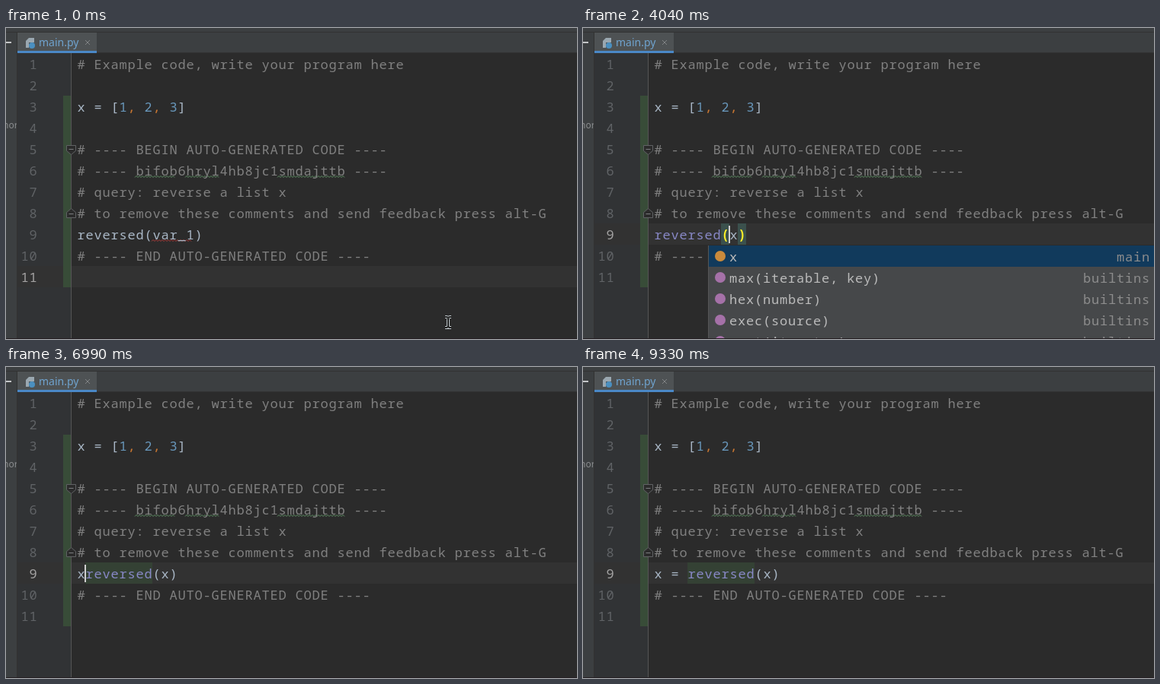
Write an HTML page that moves like this. It is 749x409 px and loops after 9.73 s.

```html
<!DOCTYPE html>
<html lang="en">
<head>
<meta charset="utf-8">
<title>Editor</title>
<style>
html, body { margin: 0; width: 100%; height: 100%; overflow: hidden; background: #2b2b2b; }
#stage { position: relative; width: 749px; height: 409px; overflow: hidden; background: #2b2b2b; }
#stage div, #stage svg { position: absolute; }
.code, .num, .popup { font: 17px/29px "Noto Sans Mono", "DejaVu Sans Mono", monospace; letter-spacing: .8px; white-space: pre; }
.ui { font: 14px/20px "Noto Sans", "Open Sans", sans-serif; white-space: pre; }
.bar { left: 0; top: 0; width: 749px; height: 33px; background: #3c3f41; }
.side { left: 0; top: 0; width: 14px; height: 409px; background: #3c3f41; overflow: hidden; }
.gutter { left: 14px; top: 33px; width: 71px; height: 376px; background: #313335; }
.edge { left: 85px; top: 33px; width: 1px; height: 376px; background: #555; }
.changed { left: 75px; top: 89px; width: 10px; height: 252px; background: #384c38; }
.tab { left: 15px; top: 6px; width: 104px; height: 24px; background: #4e5254; border-bottom: 3px solid #4a88c7; }
.rule { background: #323232; }
#current { left: 14px; width: 735px; height: 28px; background: #323232; }
.code { left: 93.4px; height: 28px; color: #a9b7c6; }
.num { left: 14px; width: 27.4px; height: 28px; text-align: right; color: #606366; }
.num.on { color: #a4a3a3; }
.c { color: #808080; }
.n { color: #6897bb; }
.p { color: #cc7832; }
.f { color: #8888c6; }
.hit, .pair { display: inline-block; height: 28px; vertical-align: top; }
.hit { background: #344134; }
.pair { background: #3b514d; color: #ffef28; font-weight: bold; }
#caret { width: 2px; height: 23px; background: #d0d0d0; }
.popup { top: 286px; width: 589px; height: 140px; background: #46484a; color: #bbb; box-shadow: 0 0 0 1px #555 inset; }
.popup div { left: 1px; width: 587px; height: 28px; }
.popup div:first-child { background: #113a5c; }
.popup i { position: absolute; left: 8px; top: 7px; width: 14px; height: 14px; border-radius: 50%; }
.popup b { position: absolute; left: 27px; font-weight: normal; }
.popup u { position: absolute; right: 8px; color: #8c8c8c; text-decoration: none; }
#mouse { --rim: #141414; --core: #fff; }
#mouse.system { --rim: #c4ccd0; --core: #1c1c1c; }
</style>
</head>
<body>
<div id="stage">
  <div class="gutter"></div>
  <div id="current"></div>
  <div class="changed"></div>
  <div class="edge"></div>
  <div class="bar"></div>
  <div class="side"><div class="ui" style="left:-4px;top:118px;font-size:12px;color:#8a8c8e">nor</div></div>
  <div class="rule" style="left:0;top:5px;width:749px;height:1px"></div>
  <div class="rule" style="left:14px;top:32px;width:735px;height:1px"></div>
  <div class="rule" style="left:14px;top:6px;width:1px;height:403px"></div>
  <div class="tab"></div>
  <div class="ui" style="left:43px;top:9px;color:#6fa3cf">main.py</div>
  <svg width="749" height="409" fill="none">
    <path d="M0 19h7" stroke="#c4c6c8" stroke-width="2"/>
    <path d="M30 13h7v6h-7v7h-4v-9z" fill="#9aa7b0"/>
    <circle cx="34" cy="23" r="4" fill="#4a8fc0"/>
    <path d="M104 16l6 6m0-6l-6 6" stroke="#808385"/>
    <path d="M79.5 154.5h12v7l-6 5-6-5zM79.5 249.5h12v-7l-6-5-6 5z" fill="#2b2b2b" stroke="#606264"/>
    <path d="M82.5 159.5h6m-6 85h6" stroke="#7c7e80"/>
    <path id="typos" stroke="#659c6b" stroke-width=".9"/>
    <path id="error" stroke="#bc3f3c" stroke-width=".9"/>
  </svg>
  <div id="rows"></div>
  <div id="caret"></div>
  <div id="popup" class="popup"></div>
  <svg id="mouse" width="14" height="20" viewBox="-7 -10 14 20" fill="none">
    <path id="beam" d="M-4-7h2L0-6 2-7H4M-4 7h2L0 6 2 7H4M0-6v12" style="stroke:var(--rim);stroke-width:4"/>
    <path d="M-4-7h2L0-6 2-7H4M-4 7h2L0 6 2 7H4M0-6v12" style="stroke:var(--core);stroke-width:2"/>
  </svg>
  <div style="left:0;top:408px;width:749px;height:1px;background:#241e22"></div>
</div>
<script>
const LOOP = 9730, LEFT = 93, PITCH = 10.99;
const $ = id => document.getElementById(id);
const span = (cls, text) => `<span class="${cls}">${text}</span>`;
const rowTop = n => 33 + 28 * (n - 1);
const colX = c => Math.floor(LEFT + c * PITCH);

const comma = span('p', ',');
const lines = [
  span('c', '# Example code, write your program here'),
  '',
  `x = [${span('n', 1)}${comma} ${span('n', 2)}${comma} ${span('n', 3)}]`,
  '',
  span('c', '# ---- BEGIN AUTO-GENERATED CODE ----'),
  span('c', '# ---- bifob6hryl4hb8jc1smdajttb ----'),
  span('c', '# query: reverse a list x'),
  span('c', '# to remove these comments and send feedback press alt-G'),
  '',
  span('c', '# ---- END AUTO-GENERATED CODE ----'),
  ''
];
$('rows').innerHTML = lines.map((html, i) => {
  const top = `style="top:${rowTop(i + 1)}px"`;
  return `<div class="num" id="num${i + 1}" ${top}>${i + 1}</div>` +
         `<div class="code" id="line${i + 1}" ${top}>${html}</div>`;
}).join('');

// Zigzag underline below columns from..to of a row
function wave(row, from, to) {
  const width = colX(to) - colX(from);
  return `M${colX(from)} ${rowTop(row) + 23.5}` + 'l2-2l2 2'.repeat(Math.floor(width / 4));
}
$('typos').setAttribute('d', wave(6, 7, 12) + wave(6, 13, 17) + wave(6, 24, 32));

const lists = {
  x: ['x|main', 'max(iterable, key)|builtins', 'hex(number)|builtins', 'exec(source)|builtins', 'next(iterator)|builtins'],
  all: ['x|main', 'abs(x)|builtins', 'all(iterable)|builtins', 'any(iterable)|builtins', 'ascii(obj)|builtins']
};
const popupHtml = name => lists[name].map((item, i) => {
  const [label, origin] = item.split('|');
  return `<div style="top:${i * 28}px"><i style="background:${i ? '#a571a8' : '#c98a3c'}"></i><b>${label}</b><u>${origin}</u></div>`;
}).join('');

// [time, text of line 9, caret column (-1 hidden), mark: plain | pair | hit, popup list, popup column]
const full = 'reversed(var_1)', call = 'reversed(x)', done = 'x = reversed(x)';
const steps = [
  [0, full, -1, 'plain'],
  [230, full, 0],
  [770, full, 15],
  [850, full, 15, 'pair'],
  [1310, full, -1, 'pair'],
  [1930, full, 15, 'pair'],
  [2090, full, 14, 'pair'],
  [2400, 'reversed(var_)', 13, 'pair'],
  [2640, 'reversed(var)', 12, 'pair'],
  [2790, 'reversed(va)', 11, 'pair'],
  [3340, 'reversed(v)', 10, 'pair'],
  [3570, 'reversed()', 9, 'pair'],
  [3730, call, 10, 'pair', 'x', 9],
  [4040, call, 9, 'pair', 'x', 9],
  [4120, call, 9, 'pair', 'all', 9],
  [4510, call, 8, 'pair'],
  [4600, call, 7],
  [4680, call, 5],
  [4760, call, 4],
  [4840, call, 2],
  [4920, call, 1],
  [5140, call, 1, 'hit'],
  [5450, call, 0, 'hit'],
  [6380, call, -1, 'hit'],
  [6990, 'x' + call, 1, 'hit'],
  [7070, 'x' + call, 1, 'hit', 'x', 0],
  [7150, 'x ' + call, 2, 'hit'],
  [7310, 'x =' + call, 3, 'hit'],
  [7470, done, 4, 'hit'],
  [8400, done, -1, 'hit'],
  [8940, done, 4, 'hit'],
  [9330, done, -1, 'hit']
];

function showStep([time, text, caret, mark, list, listCol]) {
  const row = time < 770 ? 11 : 9;
  const [, before, arg] = text.match(/^(.*)reversed\((.*)\)$/);
  const paren = ch => mark === 'pair' ? span('pair', ch) : ch;
  const nameClass = { plain: '', hit: 'f hit' }[mark] ?? 'f';
  $('line9').innerHTML = before + span(nameClass, 'reversed') + paren('(') + arg + paren(')');
  $('error').setAttribute('d', arg[0] === 'v' ? wave(9, 9, 9 + arg.length) : '');
  $('current').style.top = rowTop(row) + 'px';
  $('num9').classList.toggle('on', row === 9);
  $('num11').classList.toggle('on', row === 11);
  $('caret').style.cssText = caret < 0 ? 'display:none' : `left:${colX(caret)}px;top:${rowTop(row) + 3}px`;
  $('popup').style.display = list ? 'block' : 'none';
  if (list) {
    $('popup').innerHTML = popupHtml(list);
    $('popup').style.left = colX(listCol) - 27 + 'px';
  }
}

// Pointer centre at time t, or null while it is hidden
function pointer(t) {
  if (t < 70) return [579, 387];
  if (t < 770) {
    const p = Math.min(1, (Math.floor((t - 70) / 78.3) + 1) / 7);
    const e = p * p * (3 - 2 * p);
    return [579 - 250 * e, 387 - 114 * e];
  }
  if (t < 1310) return [329, 277];
  if (t < 2400) return [327, 278];
  if (t < 8940 || t >= 9180) return null;
  const k = Math.floor((t - 8940) / 80);
  return [365 + 63 * k, 303 + 45 * k];
}

let shown = null;
const start = performance.now();
function draw(now) {
  const t = Math.max(0, now - start) % LOOP;
  const step = steps.findLast(s => s[0] <= t);
  if (step !== shown) showStep(shown = step);
  const at = pointer(t);
  $('mouse').classList.toggle('system', t < 70);
  $('mouse').style.cssText = at
    ? `left:${Math.round(at[0]) - 6.5}px;top:${Math.round(at[1]) - 10}px`
    : 'display:none';
  requestAnimationFrame(draw);
}
draw(start);
</script>
</body>
</html>
```
